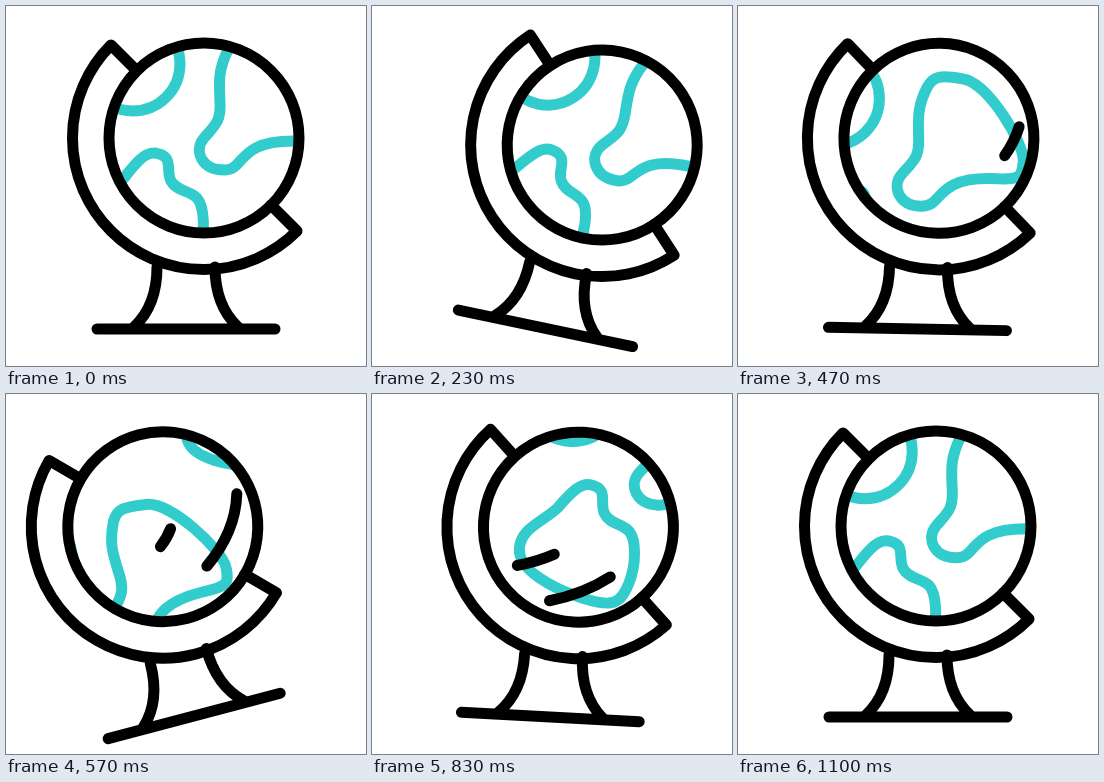
An HTML page for the animation above (1670 ms loop, 360 by 360 pixels).

```html
<!DOCTYPE html>
<html lang="en">
<head>
<meta charset="utf-8">
<title>Swinging globe</title>
<style>
  html, body { margin: 0; width: 100%; height: 100%; overflow: hidden; background: #fff; }
  svg { display: block; width: 100vw; height: 100vh; }
  path, circle { fill: none; stroke: #000; stroke-width: 11; stroke-linecap: round; stroke-linejoin: round; }
  #map * { stroke: #33cccc; }
</style>
</head>
<body>
<svg viewBox="0 0 360 360">
  <defs>
    <clipPath id="disc"><circle r="95"/></clipPath>
    <path id="leg" d="M29 261C29 286 37 307 52 321"/>
  </defs>
  <g id="stand">
    <use href="#leg" x="180"/>
    <use href="#leg" transform="translate(180) scale(-1 1)"/>
    <path d="M91 323H269"/>
    <g transform="translate(198 132)">
      <path d="M-68 -68L-93 -93A131.300 131.300 0 0 0 93 93L67 67"/>
      <g clip-path="url(#disc)">
        <g id="map">
          <g id="lands">
            <circle cx="-71" cy="-74" r="47"/>
            <path d="M24 -88C14 -68 15 -56 16 -36S11 -13 0 0S-2 32 20 32S32 3 89 3C118 4 120 2 121 -15S85 -92 60 -96S30 -98 24 -88Z"/>
            <path d="M-80 40C-66 22 -58 14 -49 15C-29 18 -39 32 -33 43S-14 52 -7 60S2 92 -5 112S-19 137 -50 129S-116 104 -116 83S-94 55 -80 40Z"/>
          </g>
          <use id="next" href="#lands"/>
        </g>
      </g>
      <path id="short" pathLength="1" d="M7 4C-7 24 -34 35 -59 41.500"/>
      <path id="long" pathLength="1" d="M80 -13C66 34 20 64 -25 75"/>
      <circle r="95"/>
    </g>
  </g>
</svg>
<script>
const LOOP = 1670, FRAME = 100 / 3, LAST = 33;
const TURN = 232; // one revolution of the map, along each axis
const $ = id => document.getElementById(id);
const move = (id, value) => $(id).setAttribute("transform", value);

function ease(k, from, to) {
  const t = Math.max(0, Math.min(1, (k - from) / (to - from)));
  return t * t * (3 - 2 * t);
}

// Right, left, a smaller right, then settle
function tilt(k) {
  return 16.9 * ease(k, 0, 11) - 31.7 * ease(k, 11, 17)
    + 21.7 * ease(k, 17, 23) - 7.7 * ease(k, 23, 27) + 0.8 * ease(k, 27, 33);
}

function trim(id, start, end) {
  const s = $(id).style, length = Math.max(0, end - start);
  s.visibility = length > 0.01 ? "visible" : "hidden";
  s.strokeDasharray = `${length} 2`;
  s.strokeDashoffset = -start;
}

function draw() {
  const t = performance.now() % LOOP;
  const k = Math.min(LAST, Math.floor((t + 3.4) / FRAME));
  const shift = TURN * ease(k, 7.5, 33.5);
  move("stand", `rotate(${tilt(k)} 180 291)`);
  move("map", `translate(${-shift} ${shift})`);
  trim("short", ease(k, 20, 30), ease(k, 13.4, 24));
  trim("long", ease(k, 18.3, 31), ease(k, 10, 23));
  requestAnimationFrame(draw);
}

move("next", `translate(${TURN} ${-TURN})`);
draw();
</script>
</body>
</html>
```
